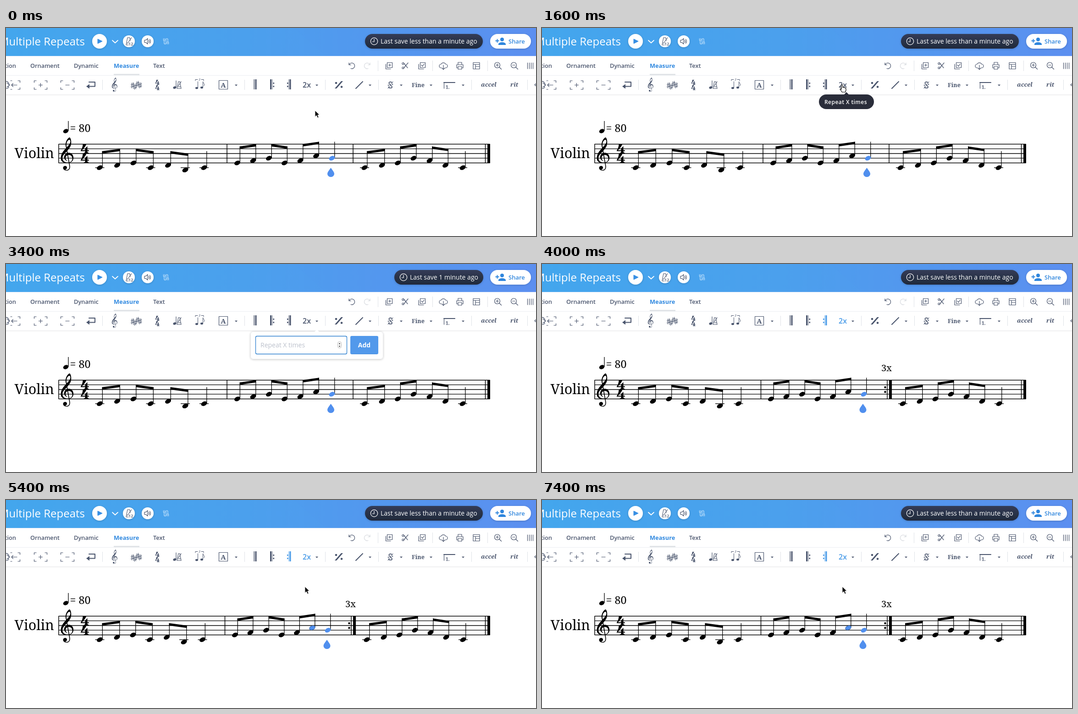
An HTML page that plays this animation: 1156x454 px, repeating every 7.6 s.

```html
<!DOCTYPE html>
<html lang="en">
<head>
<meta charset="utf-8">
<title>Multiple Repeats</title>
<style>
html, body { margin: 0; width: 100%; height: 100%; overflow: hidden; background: #fff; }
svg { display: block; width: 100%; height: 100%; color: #000; }
text { font-family: "Open Sans", "Noto Sans", sans-serif; white-space: pre; }
.serif text, text.serif { font-family: "Noto Serif", serif; }
.ink { color: #4a556d; }
.line { fill: none; stroke: currentColor; stroke-width: 1.2; stroke-linecap: round; stroke-linejoin: round; }
.fill { fill: currentColor; }
.tabs text { font-size: 12.8px; font-weight: 600; fill: #4a556d; }
.save text { font-size: 14px; font-weight: 500; fill: #fff; }
.accent { color: #4a9ce8; }

.timed { animation: 7.6s step-end infinite; }
.before { animation-name: before; }
.after { animation-name: after; }
.recent { animation-name: recent; }
.older { animation-name: older; }
.tip { animation-name: tip; }
.panel { animation-name: panel; }
.focus { animation-name: focus; }
.two { animation-name: two; }
.hint { animation-name: hint; }
.three { animation-name: three; }
.picked { animation-name: picked; }
.approach { animation-name: approach; }
.hand { animation-name: hand; }
.beam { animation-name: beam; }
.rest { animation-name: rest; }
@keyframes before { 0% { opacity: 1 } 52.63%, to { opacity: 0 } }
@keyframes after { 0% { opacity: 0 } 52.63%, to { opacity: 1 } }
@keyframes recent { 0% { opacity: 1 } 26.31% { opacity: 0 } 52.63%, to { opacity: 1 } }
@keyframes older { 0% { opacity: 0 } 26.31% { opacity: 1 } 52.63%, to { opacity: 0 } }
@keyframes tip { 0% { opacity: 0 } 18.42% { opacity: 1 } 26.31%, to { opacity: 0 } }
@keyframes panel { 0% { opacity: 0 } 26.31% { opacity: 1 } 52.63%, to { opacity: 0 } }
@keyframes focus { 0% { opacity: 0 } 36.84% { opacity: 1 } 52.63%, to { opacity: 0 } }
@keyframes two { 0% { opacity: 1 } 42.1%, to { opacity: 0 } }
@keyframes hint { 0% { opacity: 0 } 42.1% { opacity: 1 } 47.36%, to { opacity: 0 } }
@keyframes three { 0% { opacity: 0 } 47.36% { opacity: 1 } 52.63%, to { opacity: 0 } }
@keyframes picked { 0% { opacity: 0 } 65.78%, to { opacity: 1 } }
@keyframes approach {
  0% { opacity: 1; transform: translate(674px, 180px) }
  10.52% { transform: translate(670px, 170px) }
  13.15% { opacity: 1; transform: translate(662px, 151px) }
  15.78%, to { opacity: 0; transform: translate(655px, 125px) }
}
@keyframes hand { 0% { opacity: 0 } 15.78% { opacity: 1 } 28.94%, to { opacity: 0 } }
@keyframes beam { 0% { opacity: 0 } 28.94% { opacity: 1 } 39.47%, to { opacity: 0 } }
@keyframes rest {
  0% { opacity: 0; transform: translate(652px, 189px) }
  68.42% { opacity: 1; transform: translate(652px, 189px) }
  84.2%, to { opacity: 1; transform: translate(655px, 189px) }
}
</style>
</head>
<body>
<svg viewBox="0 0 1156 454" preserveAspectRatio="none">
<defs>
  <linearGradient id="sky" gradientUnits="userSpaceOnUse" x1="0" y1="0" x2="1156" y2="60">
    <stop offset="0" stop-color="#43a6ed"/><stop offset=".45" stop-color="#4ba0ed"/><stop offset="1" stop-color="#5d8ff0"/>
  </linearGradient>
  <linearGradient id="night" x2="0" y2="1"><stop stop-color="#343c57"/><stop offset="1" stop-color="#202a3b"/></linearGradient>
  <filter id="soft" x="-20%" y="-30%" width="140%" height="170%"><feDropShadow dx="0" dy="1" stdDeviation="2" flood-opacity=".2"/></filter>
  <path id="clef" fill="currentColor" d="M140.300 248C140 258 119.500 267 119.500 284.500C119.500 291 125 295 133.500 295C142 295 147.200 290 147.200 283.500C147.200 277 142.500 272.300 137 272.300C131 272.300 126.800 277 126.800 282C126.800 286 129.500 289 133 290L133.400 289.200C131 288 130 286 130 283.700C130 280 133 277 137 277C142 277 144.600 281 144.600 285.500C144.600 291 140 293.600 134.500 293.600C127 293.600 123.200 289 123.200 284C123.200 273 142.300 266 142.300 250C142.300 244 140.500 239 138.300 238.800C133 242 129.600 249 129.800 256L138 301C138.800 306 136.500 309.800 132.500 309.800C131 309.800 129.500 309.400 129.500 308.900C131.500 308.500 133 307 133 304.800C133 302.500 131.300 301 129 301C126.500 301 124.500 302.700 124.500 305.300C124.500 308.800 128 311.200 132 311.200C137.500 311.200 140.400 307 139.600 301L131.900 256.500C131.700 250 134 245.500 137.500 244C139.300 243.500 140.400 245.500 140.300 248Z"/>
  <path id="four" fill="currentColor" d="M4 0H11C9 6 5 10 2.500 13H8.500V9L13 4.500V13H16V15H13C13 18 14 18.500 16 18.800V20H6V18.800C8 18.500 8.500 18 8.500 15H0V13.500C3 9 4 4 4 0Z"/>
  <path id="caret" fill="currentColor" d="M-3-1.500H3L0 1.800Z"/>
  <path id="sharp" class="line" d="M-1.500-5V6M1.500-6V5M-3.500-1L3.500-3M-3.500 3.500L3.500 1.500"/>
  <path id="arrow" d="M0 0V14.500L3.400 11.400L5.800 17L8.500 15.800L6.100 10.400H10.600Z" fill="#000" stroke="#fff" stroke-width="1"/>
  <path id="drop" fill="#508fee" d="M0-10C3-5 7.500-1 7.500 3.500A7.500 6.700 0 0 1-7.500 3.500C-7.500-1-3-5 0-10Z"/>
  <g id="clock" fill="none" stroke="#fff" stroke-width="1.200"><circle r="7.700"/><path d="M0-5V1H-4.500"/></g>
</defs>

<g id="header">
  <path d="M0 0H1156V61H0Z" fill="url(#sky)"/>
  <path d="M0 61.500H1156" stroke="#5b8def" opacity=".15"/>
  <path d="M628 0H1156V61H698Z" fill="#4d87ef" opacity=".08"/>
  <text x="172" y="38" text-anchor="end" font-size="24" font-weight="500" fill="#fff">Multiple Repeats</text>
  <g fill="#fff" filter="url(#soft)"><circle cx="204" cy="29" r="16"/><circle cx="268" cy="29" r="13"/><circle cx="309" cy="29" r="13"/></g>
  <path d="M200 24L210 29L200 34Z" fill="#378fe4" stroke="#378fe4" stroke-linejoin="round"/>
  <path class="line" style="color:#fff;stroke-width:1.800" d="M232 27L238 32.500L244 27"/>
  <g class="ink">
    <path class="line" style="stroke-width:1.100" d="M262 37L265 21H270L271 28M262 37H267M263 33H266M266 32L274 21"/>
    <text x="267" y="38" font-size="9" font-weight="600" class="fill">12</text>
    <path class="line" d="M302 26.500H305L309 23V35L305 31.500H302ZM311.500 26.500Q313.500 29 311.500 31.500M313.500 24.500Q317 29 313.500 33.500"/>
  </g>
  <path class="line" style="color:#c9e5fc" d="M345 28V33Q345 35 347 35T349 33V25Q349 23 351 23T353 25V30M343.500 23V27Q345 29 346.500 27V23M351.500 35V31Q353 29 354.500 31V35"/>
  <g class="save timed recent">
    <rect x="783" y="13" width="257" height="32" rx="16" fill="url(#night)" filter="url(#soft)"/>
    <use href="#clock" x="803" y="29"/><text x="817" y="34">Last save less than a minute ago</text>
  </g>
  <g class="save timed older">
    <rect x="847" y="13" width="194" height="32" rx="16" fill="url(#night)" filter="url(#soft)"/>
    <use href="#clock" x="867" y="29"/><text x="881" y="34">Last save 1 minute ago</text>
  </g>
  <rect x="1056" y="13" width="89" height="32" rx="16" fill="#fff" filter="url(#soft)"/>
  <g fill="#2f86dd">
    <circle cx="1082" cy="25" r="4"/><path d="M1074 37V34.500Q1076 31 1082 31T1090 34.500V37ZM1070.500 24H1072.500V27H1075.500V29H1072.500V32H1070.500V29H1067.500V27H1070.500Z"/>
    <text x="1096" y="34" font-size="13" font-weight="600">Share</text>
  </g>
</g>

<g class="tabs">
  <path d="M0 103.500H1156" stroke="#eceef1"/>
  <path d="M235 101.500H291" stroke="#dde0e5" stroke-width="2.500"/>
  <text x="22" y="87" text-anchor="end">Articulation</text><text x="53" y="87">Ornament</text><text x="148" y="87">Dynamic</text>
  <text x="235" y="87" style="fill:#328ae0;font-weight:700">Measure</text><text x="321" y="87">Text</text>
</g>

<g class="ink line" id="actions">
  <path d="M748 76V80.500H752.500M748.500 80A6.300 6.300 0 1 1 752 88.500"/>
  <path opacity=".22" d="M794 76V80.500H789.500M793.500 80A6.300 6.300 0 1 0 790 88.500"/>
  <path d="M831.500 75.500H842.500V86.500H831.500ZM828.500 79V89.500H839M837 78.500V83.500M834.500 81H839.500"/>
  <path d="M867 76L876 87M867 88L877 76"/><circle cx="866" cy="77.500" r="2"/><circle cx="866" cy="87" r="2"/>
  <path d="M903.500 75.500H914.500V86.500H903.500ZM900 79V89.500H911M906 81L908.500 83.500L912 78.500"/>
  <path d="M950 87H949A4 4 0 0 1 949 79A5.500 5.500 0 0 1 959 79A4 4 0 0 1 959 87H958M954 81V90M951 87.500L954 90.500L957 87.500"/>
  <path d="M986 80V75H994V80M986 87H983V80H997V87H994M986 84H994V90H986Z"/>
  <path d="M1019 75.500H1033V89.500H1019ZM1019 79.500H1033M1024 79.500V89.500M1024 84H1033"/>
  <circle cx="1071.500" cy="81" r="6"/><path d="M1076 85.500L1080.500 90M1068.500 81H1074.500M1071.500 78V84"/>
  <circle cx="1107.500" cy="81" r="6"/><path d="M1112 85.500L1116.500 90M1104.500 81H1110.500"/>
  <path d="M1137.500 76V89M1141.500 76V89M1145.500 76V89M1149.500 76V89"/>
</g>

<path d="M0 146H1156" stroke="#f0f0f1" stroke-width="2"/>
<path d="M811.500 71V94M930.500 71V94M1050.500 71V94M210.500 113V135M520.500 113V135M696.500 113V135M812.500 113V135M1015.500 113V135M1137.500 113V135" stroke="#dfe2e7"/>

<g class="ink" id="tools">
  <g class="line">
    <path d="M-3 117A7 7 0 0 1 5 128M0 132Q5 132 6 129M2 120L8 124.500L2 129M24 124.500H12M15.500 121L12 124.500L15.500 128M10 115H13M10 134H13M26 115H30.500V119M30.500 130V134H26"/>
    <path d="M66 115H61.500V119M61.500 130V134H66M85 115H89.500V119M89.500 130V134H85M71.500 124.500H79.500M75.500 120.500V128.500"/>
    <path d="M124 115H119.500V119M119.500 130V134H124M144 115H148.500V119M148.500 130V134H144M130 124.500H138"/>
    <path style="stroke-width:2" d="M181 118H194V127.500H178"/>
    <path d="M464.500 114.500H483.500V133.500H464.500Z"/>
    <path style="stroke-width:2" d="M763 132L778 117"/>
    <path d="M955.500 132V119H979"/><path style="stroke-width:2" d="M955 119H979"/>
    <path d="M1159 119L1153 124L1159 129"/>
  </g>
  <path class="fill" d="M182 122.500V132.500L175 127.500Z"/>
  <use href="#clef" transform="translate(179.500 5.500) scale(.43)"/>
  <use href="#sharp" x="276" y="125"/><use href="#sharp" x="281.500" y="128"/><use href="#sharp" x="287" y="122"/><use href="#sharp" x="292.500" y="125"/>
  <use href="#four" transform="translate(325.500 113) scale(.58 .55)"/><use href="#four" transform="translate(325.500 124.500) scale(.58 .55)"/>
  <g class="fill"><ellipse cx="368" cy="130" rx="3.600" ry="2.600" transform="rotate(-20 368 130)"/>
    <ellipse cx="416" cy="131" rx="3" ry="2.200"/><ellipse cx="427" cy="130" rx="3" ry="2.200"/></g>
  <path class="line" d="M371 129V115M373 132L376 117H379L382 132ZM375 128H381M376 126L382 117"/>
  <path class="line" style="stroke-width:1" d="M418.500 130V117M429.500 129V117Q430 120 432 121.500T432 126M413 115V112.500H418M426 112.500H431V115"/>
  <text x="422" y="114.500" text-anchor="middle" font-size="7" font-style="italic" class="fill">3</text>
  <g class="serif fill" font-weight="700">
    <text x="474" y="130" text-anchor="middle" font-size="15">A</text>
    <text x="885" y="129" font-size="12.600">Fine</text>
    <text x="959" y="133" font-size="10">1.</text>
    <g font-style="italic" font-size="13"><text x="1036" y="128">accel</text><text x="1100" y="128">rit</text></g>
  </g>
  <use href="#caret" x="502" y="125"/><use href="#caret" x="678" y="125"/><use href="#caret" x="794" y="125"/><use href="#caret" x="862" y="125"/><use href="#caret" x="927" y="125"/><use href="#caret" x="997" y="125"/>
  <path class="fill" d="M540.500 112H542V134H540.500ZM543.500 112H546.500V134H543.500ZM576 112H579V134H576ZM580 112H581V134H580ZM582.500 119H585V122H582.500ZM582.500 126H585V129H582.500Z"/>
  <path class="fill" d="M717 132L731 116H735L721 132Z"/><circle class="fill" cx="720" cy="120" r="2.300"/><circle class="fill" cx="732" cy="128.500" r="2.300"/>
  <path class="line" style="stroke-width:1.700" d="M842 119.500C840 116.500 834 117.500 835.500 121S842.500 126 842 129S835 131.500 834.500 128.500"/>
  <path class="line" style="stroke-width:1" d="M833 132L844 117"/><circle class="fill" cx="834" cy="125" r="1.200"/><circle class="fill" cx="843" cy="123" r="1.200"/>
  <g id="repeatTools">
    <path class="fill" d="M618.500 112H621.500V134H618.500ZM616.500 112H617.500V134H616.500ZM613 119H615.500V122H613ZM613 126H615.500V129H613Z"/>
    <text x="647" y="130" font-size="16" font-weight="600" class="fill">2x</text>
  </g>
  <g class="timed after accent">
    <path d="M612 111H623V135H612ZM646 116H667V133H646Z" fill="#fff"/>
    <use href="#repeatTools"/>
  </g>
</g>

<g id="staff">
  <path d="M115 253.500H1055M115 263.700H1055M115 274H1055M115 284.200H1055M115 294.500H1055" stroke="#000" stroke-width="1.300"/>
  <path d="M115 253V295M1045.500 253V295" stroke="#000" stroke-width="1.500"/><path d="M1050 253H1056V295H1050Z"/>
  <use href="#clef"/>
  <use href="#four" transform="translate(163 253.500) scale(1.120 1.020)"/><use href="#four" transform="translate(163 274.300) scale(1.120 1.020)"/>
  <ellipse cx="130.500" cy="225" rx="6" ry="4.300" transform="rotate(-25 130.500 225)"/><path d="M136 224V203" stroke="#000" stroke-width="1.300"/>
  <g class="serif" font-weight="500"><text x="18.500" y="284" font-size="30.300">Violin</text><text x="139.500" y="227" font-size="23.200">= 80</text></g>
</g>
<g id="plain" class="timed before"><path d="M482 253V295M757 253V295" stroke="#000" stroke-width="1.500"/><use href="#drop" x="708.500" y="315"/></g>
<g id="repeated" class="timed after">
  <path d="M477.500 253V295M753 253V295" stroke="#000" stroke-width="1.500"/><path d="M757 253H763V295H757Z"/>
  <circle cx="748.500" cy="269" r="2.200"/><circle cx="748.500" cy="279.300" r="2.200"/>
  <text class="serif" x="740" y="234" font-size="20" font-weight="500">3x</text><use href="#drop" x="700" y="315"/>
</g>

<g class="timed tip">
  <path d="M658 146L664 140L670 146Z" fill="#2a2d3a"/><rect x="604" y="145" width="120" height="32" rx="16" fill="#2a2d3a"/>
  <text x="616" y="165.500" font-size="12" font-weight="600" letter-spacing=".45" fill="#fff">Repeat X times</text>
</g>
<g class="timed panel">
  <rect x="533.500" y="147.500" width="289" height="60" rx="6" fill="#fff" stroke="#e6e7e9" filter="url(#soft)"/>
  <path d="M672 149L678 143L684 149Z" fill="#fff"/>
  <rect x="544.500" y="157.500" width="199" height="39" rx="3" fill="#fff" stroke="#7fbce8"/>
  <rect class="timed focus" x="544.500" y="157.500" width="199" height="39" rx="3" fill="none" stroke="#2f80cf" stroke-width="1.300"/>
  <rect x="723.500" y="169.500" width="8" height="14" rx="4" fill="#fff" stroke="#b5b5b5"/>
  <path d="M725.500 175L727.500 172L729.500 175ZM725.500 178.500L727.500 181.500L729.500 178.500Z" fill="#444"/>
  <g font-size="14" fill="#333b48">
    <text class="timed two" x="555" y="182">2</text><text class="timed hint" x="555" y="182" fill="#bbc0cb">Repeat X times</text><text class="timed three" x="555" y="182">3</text>
  </g>
  <rect x="751" y="157" width="61" height="40" rx="3" fill="#5299eb"/><path d="M754 196.500H809" stroke="#438bdd"/>
  <text x="781.500" y="182" text-anchor="middle" font-size="14" font-weight="700" fill="#fff">Add</text>
</g>

<g class="timed approach"><use href="#arrow" transform="scale(.95)"/></g>
<path class="timed hand" fill="#fff" stroke="#000" stroke-width="1.200" stroke-linejoin="round" d="M653 134V125.500Q653 123.500 654.500 123.500T656 125.500V130Q657.500 128.500 658.500 130Q660 129 661 131Q663 130.500 663 133V136L661.500 140H654.500L650 133.500Q651 131.500 653 134Z"/>
<path class="timed beam line" style="stroke:#111;stroke-width:1.300" d="M637.500 169.500Q640.500 169.500 640.500 172Q640.500 169.500 643.500 169.500M640.500 171V183M637.500 184.500Q640.500 184.500 640.500 182Q640.500 184.500 643.500 184.500M639 178H642"/>
<g class="timed rest"><use href="#arrow" transform="scale(.95)"/></g>
</svg>
<script>
const tune = "CDECDBCEFGEFAGCDEGFDC";
const step = 5.17, stemLength = 36;
const blue = "#508fee";
const pitchY = name => 310 - step * "BCDEFGA".indexOf(name);

const head = (x, y, color, cls = "") =>
  `<ellipse class="${cls}" cx="${x}" cy="${y}" rx="6.800" ry="4.600" fill="${color}" transform="rotate(-25 ${x} ${y})"/>`;
const stroke = d => `<path d="${d}" stroke="#000" stroke-width="1.300"/>`;

// The lower note of a beamed pair sets the beam, which always rises by one step.
function stemTop(i) {
  const k = i % 7, y = pitchY(tune[i]);
  if (k === 6) return y - stemLength;
  const partner = pitchY(tune[k % 2 ? i - 1 : i + 1]);
  return y > partner ? y - stemLength : partner - stemLength - step;
}

function drawNotes(id, xs, withPick) {
  let out = "";
  xs.forEach((x, i) => {
    const k = i % 7, y = pitchY(tune[i]), stem = x + 5.8, top = stemTop(i);
    out += stroke(`M${stem} ${y - 1.5}V${top}`);
    if (y > 300) out += stroke(`M${x - 10} 304.800H${x + 10}`);
    if (k < 6 && k % 2 === 0) {
      const end = xs[i + 1] + 6.4;
      out += `<path d="M${stem - .6} ${top}L${end} ${stemTop(i + 1)}v${step}L${stem - .6} ${top + step}Z"/>`;
    }
    out += head(x, y, i === 13 ? blue : "#000");
    if (withPick && i === 12) out += head(x, y, blue, "timed picked");
  });
  document.getElementById(id).insertAdjacentHTML("beforeend", out);
}

drawNotes("plain", [204.5, 242.5, 278, 315.5, 353.5, 391, 432, 504.5, 539, 573.5, 607.5, 642, 676.5, 711, 782, 820, 854.5, 889, 924, 958.5, 996], false);
drawNotes("repeated", [204.5, 242, 277, 313.5, 350.5, 388, 428.5, 499.5, 533, 567.5, 601, 634.5, 668, 702, 787, 824, 858, 892, 926, 960, 997], true);
</script>
</body>
</html>
```
